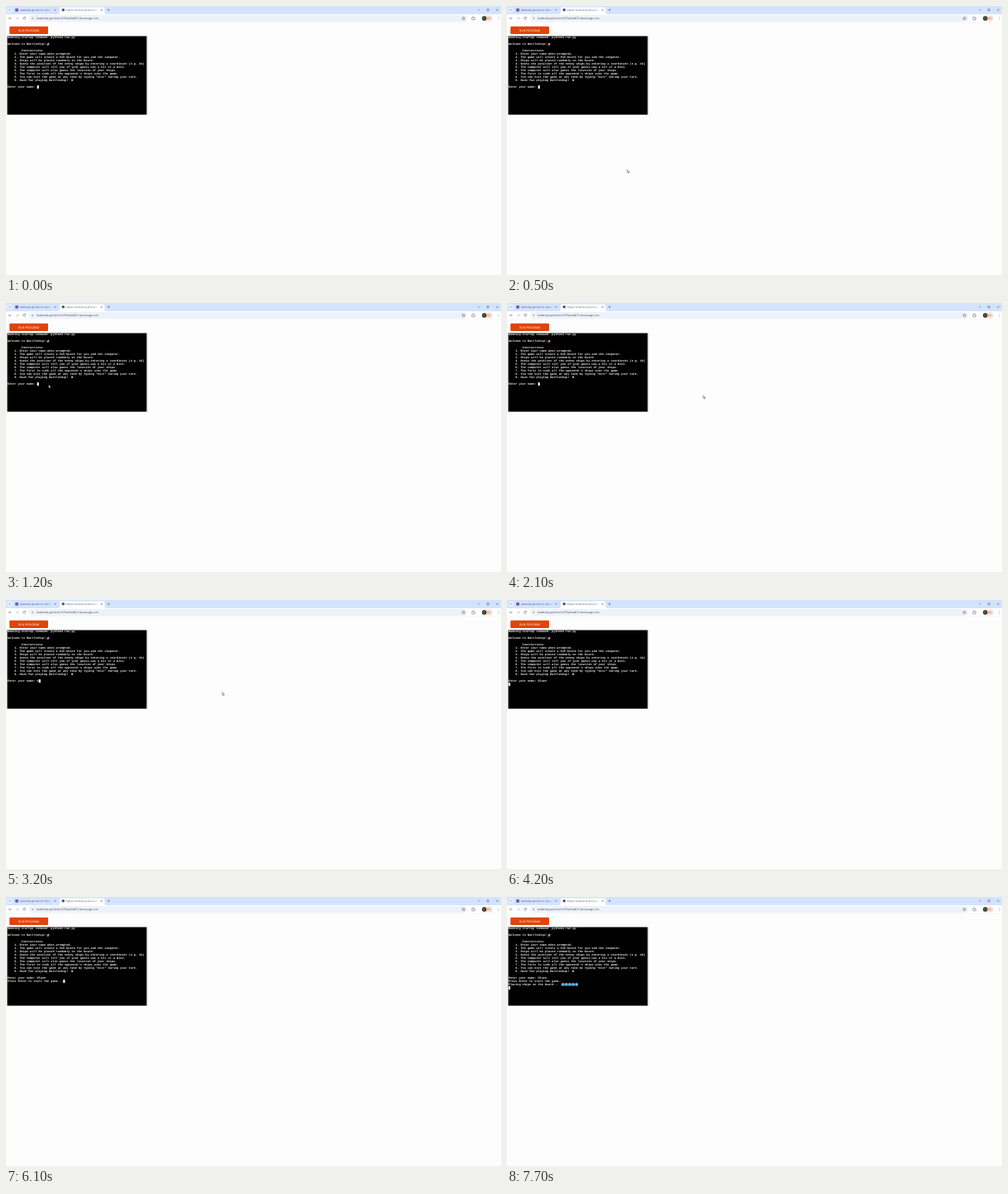
These frames come from a looping animation (600 px wide and 326 px high, 8 s). An HTML page:

```html
<!DOCTYPE html>
<html lang="en">
<head>
<meta charset="utf-8">
<title>Terminal game</title>
<style>
  html, body { margin: 0; width: 100%; height: 100%; overflow: hidden; background: #fdfdfd; }
  svg { display: block; width: 100vw; height: 100vh; }
  text { white-space: pre; text-rendering: geometricPrecision; font-family: "Open Sans", sans-serif; }
  .tab { font-size: 2.8px; fill: #3c4350; }
  .url { font-size: 3.12px; fill: #30343a; }
  .term text { font: bold 3.517px "Liberation Mono", monospace; fill: #f2f2f2; }
  .icon { fill: none; stroke: #50555c; stroke-width: .5; }
</style>
</head>
<body>
<svg viewBox="0 0 600 326" preserveAspectRatio="none">
  <defs>
    <linearGradient id="fadeIdle"><stop offset="0" stop-color="#d3e3fd" stop-opacity="0"/><stop offset="1" stop-color="#d3e3fd"/></linearGradient>
    <linearGradient id="fadeActive"><stop offset="0" stop-color="#fff" stop-opacity="0"/><stop offset="1" stop-color="#fff"/></linearGradient>
    <g id="wave">
      <rect width="3.7" height="3.5" rx=".6" fill="#1c8ed8"/>
      <path d="M.3 2.6Q.6.7 2.1.7 3.2.8 3.1 1.6 2.3 1.2 2 1.8 2 2.6 3.4 2.7" fill="none" stroke="#bfe9ff" stroke-width=".6"/>
    </g>
  </defs>

  <rect width="600" height="326" fill="#fdfdfd"/>

  <!-- tab strip -->
  <rect width="600" height="10" fill="#d3e3fd"/>
  <rect x="1.4" y="1.4" width="6.4" height="6.6" rx="1.8" fill="#e4eefe"/>
  <path class="icon" d="M3.6 4.2l1 1 1-1"/>
  <rect x="11.2" y="3" width="3.7" height="3.7" rx=".6" fill="#7858b0"/>
  <text class="tab" x="17" y="5.8">battleship-pp3-birch | Velopo</text>
  <rect x="49" y="2" width="7" height="6" fill="url(#fadeIdle)"/>
  <rect x="56" y="2" width="8" height="6" fill="#d3e3fd"/>
  <path d="M63 10Q65 10 65 8V3.5Q65 1.5 67 1.5H117.500Q119.500 1.500 119.500 3.500V8Q119.500 10 121.500 10Z" fill="#fff"/>
  <circle cx="69.300" cy="4.800" r="1.800" fill="#55585e"/>
  <text class="tab" x="73" y="5.8">Python Terminal by Fern Acade</text>
  <rect x="106" y="2" width="6" height="6" fill="url(#fadeActive)"/>
  <rect x="112" y="2" width="6" height="6" fill="#fff"/>
  <path class="icon" d="M58.600 3.800l2 2m0-2l-2 2M114.800 3.800l2 2m0-2l-2 2M122.800 4.800h3m-1.500-1.500v3"/>
  <path class="icon" d="M572 4.800h2.400M583 3.700h2.200v2.200h-2.200zM594.300 3.700l2.200 2.200m0-2.200l-2.200 2.200"/>

  <!-- toolbar -->
  <rect y="10" width="600" height="10" fill="#fff"/>
  <rect y="19.800" width="600" height=".4" fill="#e6e8ec"/>
  <rect x="28" y="11" width="531" height="8" rx="4" fill="#edf1f9"/>
  <path class="icon" d="M6.500 15h-3m1.300-1.300L3.500 15l1.300 1.300"/>
  <path class="icon" d="M12 15h3m-1.300-1.300L15 15l-1.300 1.300" opacity=".5"/>
  <path class="icon" d="M23.500 14.200a1.500 1.500 0 1 0 .1 1.200M23.700 13.200v1.200h-1.200"/>
  <circle cx="32.300" cy="15" r="2.600" fill="#fff"/>
  <path class="icon" d="M30.900 14.200h2.800m-2.800 1.600h2.800"/>
  <text class="url" x="37" y="16.100">battleship-pp3-birch-97f5a23a9872.herokuapp.com</text>
  <path d="M554.500 13l.55 1.250 1.350.15-1 .9.300 1.400-1.200-.7-1.200.7.300-1.400-1-.9 1.350-.15z" class="icon"/>
  <path class="icon" d="M564.800 13.800h1v-.6h1v.6h1v1h.6v1h-.6v1h-3z"/>
  <rect x="576.500" y="11.400" width="13" height="7.200" rx="3.600" fill="#f9dcd5"/>
  <circle cx="579.700" cy="15" r="2.700" fill="#2e3d22"/>
  <circle cx="579.500" cy="14.700" r="1" fill="#79744a"/>
  <text x="583.300" y="16" font-size="2.800" fill="#9b3327">Err</text>
  <g fill="#50555c"><circle cx="597" cy="13.700" r=".4"/><circle cx="597" cy="15" r=".4"/><circle cx="597" cy="16.300" r=".4"/></g>

  <!-- page -->
  <rect x="4.200" y="24.800" width="46.800" height="9.200" rx="1.200" fill="#e0440e"/>
  <text x="27.600" y="30.700" font-size="3.500" text-anchor="middle" fill="#fff">RUN PROGRAM</text>
  <rect x="170.500" y="36.500" width="1.900" height="95.200" fill="#ececec"/>
  <rect x="1.500" y="36.500" width="169" height="95.200" fill="#000"/>

  <g class="term">
    <g id="lines"></g>
    <g transform="translate(49 44.300)">
      <path d="M.3 1.600L2.300.3 3.500 1.200 3.400 3.300 1.500 3.500z" fill="#a86bb5"/>
      <path d="M.2 2.200h1.800l-.6 1.300H.5z" fill="#e56680"/>
      <path d="M1.900.7l1 .3-.2 1.200z" fill="#e9e5f3"/>
    </g>
    <path d="M78.900 89.200h.8v-.8h.9v.8h.9l-.5 1.700h-1.500z" fill="#b9bec5"/>
    <g id="waves">
      <use href="#wave" x="65.900" y="104.300"/><use href="#wave" x="70" y="104.300"/><use href="#wave" x="74.100" y="104.300"/><use href="#wave" x="78.200" y="104.300"/><use href="#wave" x="82.300" y="104.300"/>
    </g>
    <rect id="caret" width="2.100" height="4" fill="#fff"/>
  </g>

  <path id="pointer" d="M0 0V3.700L.85 2.950 1.400 4.200 2 3.900 1.450 2.700H2.600Z" fill="#fff" stroke="#222" stroke-width=".4"/>
</svg>

<script>
const LOOP = 8000, COL = 2.11, ROW = 4, LEFT = 1.8, TOP = 36.2;
const $ = id => document.getElementById(id);
const PLAYER = "Olwen";
const PROMPT = "Enter your name: ";
const START = "Press Enter to start the game...";

function addLine(row, content = "") {
  const el = document.createElementNS("http://www.w3.org/2000/svg", "text");
  el.setAttribute("x", LEFT);
  el.setAttribute("y", TOP + row * ROW + 3.1);
  el.textContent = content;
  $("lines").append(el);
  return el;
}

addLine(0, "Running startup command: python3 run.py");
addLine(2, "Welcome to Battleship!");
addLine(4, "        Instructions:");
[
  "Enter your name when prompted.",
  "The game will create a 5x5 board for you and the computer.",
  "Ships will be placed randomly on the board.",
  "Guess the position of the enemy ships by entering a coordinate (e.g. A1)",
  "The computer will tell you if your guess was a hit or a miss.",
  "The computer will also guess the location of your ships.",
  "The first to sink all the opponent's ships wins the game.",
  "You can exit the game at any time by typing \"exit\" during your turn.",
  "Have fun playing Battleship!"
].forEach((rule, i) => addLine(5 + i, `    ${i + 1}. ${rule}`));

const nameLine = addLine(15), startLine = addLine(16), placingLine = addLine(17);

// [time, x, y]; no position hides the pointer
const pointerSteps = [
  [0],
  [200, 226, 211], [300, 213, 210], [400, 176, 205], [500, 145.8, 198.3],
  [700, 139, 191], [800, 121, 169], [900, 98, 141], [1000, 74, 118], [1100, 57, 104], [1200, 51.8, 99.2],
  [1900, 84, 102], [2000, 165, 108], [2100, 238, 112], [2200, 262.2, 111.6],
  [4100]
];

// [time, typed letters, caret row, caret column]
const termSteps = [
  [0, 0, 15, 17],
  [3200, 1, 15, 18], [3300, 2, 15, 19], [3400, 4, 15, 21], [3500, 5, 15, 22],
  [4200, 5, 16, 0],
  [5100, 5, 16, START.length],
  [7700, 5, 18, 0]
];

const stepAt = (steps, t) => steps.findLast(step => step[0] <= t);
const move = (el, x, y) => el.setAttribute("transform", `translate(${x} ${y})`);

function draw(t) {
  const [, x, y] = stepAt(pointerSteps, t);
  $("pointer").style.display = x === undefined ? "none" : "";
  if (x !== undefined) move($("pointer"), x, y);

  const [, typed, row, col] = stepAt(termSteps, t);
  const placing = t >= 7700;
  nameLine.textContent = PROMPT + PLAYER.slice(0, typed);
  startLine.textContent = t >= 5100 ? START : "";
  placingLine.textContent = placing ? "Placing ships on the board..." : "";
  $("waves").style.display = placing ? "" : "none";
  move($("caret"), LEFT + col * COL, TOP + row * ROW);
}

const begin = performance.now();
function frame() {
  draw((performance.now() - begin) % LOOP);
  requestAnimationFrame(frame);
}
frame();
</script>
</body>
</html>
```
